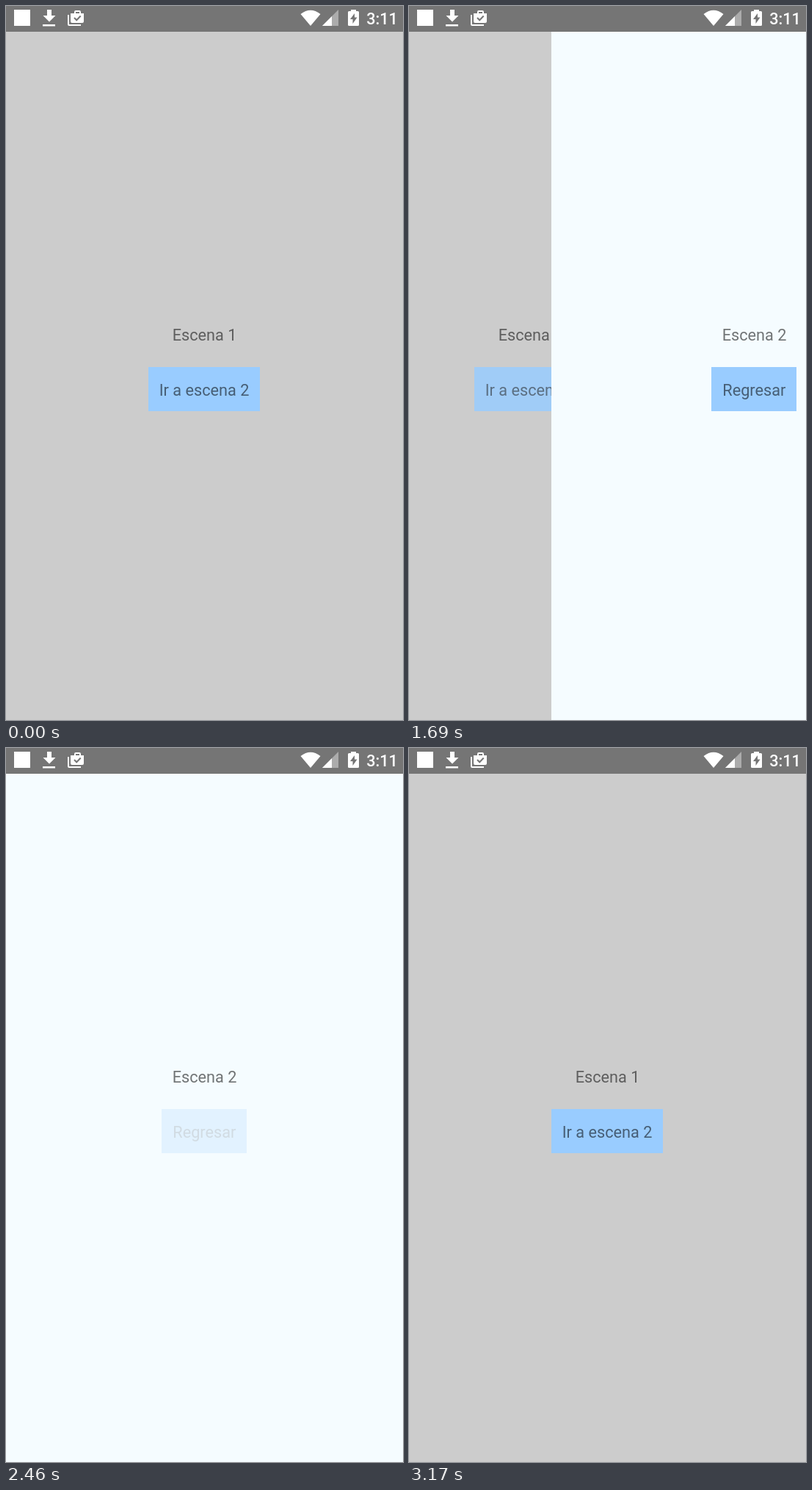
Recreate the animation shown at these times as an HTML page. Size 541 by 971 pixels, loop 3.94 s.

```html
<!DOCTYPE html>
<html lang="es">
<head>
<meta charset="utf-8">
<title>Escenas</title>
<style>
  html, body { margin: 0; width: 100%; height: 100%; overflow: hidden; background: #ccc; }
  svg { display: block; width: 541px; height: 971px; }
  text { font: 400 21.7px Roboto, sans-serif; fill: #000; fill-opacity: .54; text-anchor: middle; }
  .clock { font-weight: 500; fill: #fff; fill-opacity: 1; }
  .box { fill: #9cf; }
  .icons { fill: #fff; }
</style>
</head>
<body>
<svg viewBox="0 0 541 971">
  <rect width="541" height="971" fill="#ccc"/>
  <g id="first">
    <text x="270.5" y="455">Escena 1</text>
    <g id="go">
      <rect class="box" x="194" y="491" width="152" height="60"/>
      <text x="270" y="530">Ir a escena 2</text>
    </g>
  </g>
  <g id="second">
    <rect x="-6" y="35" width="560" height="936" fill="#f5fcff"/>
    <text x="270.5" y="455">Escena 2</text>
    <g id="back">
      <rect class="box" x="212" y="491" width="116" height="60"/>
      <text x="270.3" y="530">Regresar</text>
    </g>
  </g>
  <rect width="541" height="35" fill="#757575"/>
  <g class="icons">
    <rect x="11" y="5" width="22" height="22"/>
    <path d="M56 5h6v8h5.5L59 21.5 50.500 13H56zM50 25h17v2.500H50z"/>
    <path d="M84 12h2v13h16v2H86q-2 0-2-2z"/>
    <path d="M88 10h5V8q0-2 2-2h5q2 0 2 2v2h4v11q0 2-2 2H90q-2 0-2-2zM95 8v2h5V8z" fill-rule="evenodd"/>
    <path d="M93 16l3.200 3.200 5.500-5.700" fill="none" stroke="#757575" stroke-width="2"/>
    <path d="M401.500 11Q415 .500 428.500 11L415 27z"/>
    <path d="M431 27L453 5V27z" fill-opacity=".4"/>
    <path d="M431 27L444 14V27z"/>
    <path d="M466 8.500q0-1.500 1.500-1.500H470V5h7v2h2.500q1.500 0 1.500 1.500v17q0 1.500-1.500 1.500h-12q-1.500 0-1.500-1.500z"/>
    <path d="M475 10v5.500h3.500L472.500 24v-6H469z" fill="#757575"/>
  </g>
  <text class="clock" x="512.500" y="24.500">3:11</text>
</svg>
<script>
  const LOOP = 3940, WIDTH = 541;
  const PUSH = { press: 1300, start: 1594, end: 2000 };
  const POP = { press: 2460, start: 2749, end: 3170 };
  const STEPS = [0, 1300, 1530, 1610, 1690, 1780, 1860, 1930, 2000,
                 2460, 2710, 2780, 2870, 2940, 3020, 3100, 3170];
  const [first, second, go, back] =
    ['first', 'second', 'go', 'back'].map(id => document.getElementById(id));

  // Overdamped spring: distance left, from 1 to 0.
  function remaining(t, { start, end }) {
    if (t <= start) return 1;
    if (t >= end) return 0;
    const s = (t - start) / 1000;
    return 1.193 * Math.exp(-12.5 * s) - 0.193 * Math.exp(-66.9 * s);
  }

  // Pressed buttons drop to 20% and ease back after release.
  function opacity(t, { press, start }) {
    if (t < press) return 1;
    const p = Math.min(1, Math.max(0, (t - start) / 140));
    const eased = p < 0.5 ? 2 * p * p : 1 - 2 * (1 - p) ** 2;
    return 0.2 + 0.8 * eased;
  }

  function move(node, x) {
    node.setAttribute('transform', `translate(${x} 0)`);
  }

  function draw(t) {
    const x = t < POP.press ? remaining(t, PUSH) : 1 - remaining(t, POP);
    const gap = x > 0 ? 6 : 0;
    move(first, Math.round(-164 * (1 - x)));
    move(second, Math.round(WIDTH * x) + gap);
    second.style.display = x < 1 ? '' : 'none';
    go.setAttribute('opacity', opacity(t, PUSH));
    back.setAttribute('opacity', opacity(t, POP));
  }

  function tick() {
    const t = performance.now() % LOOP;
    draw(STEPS.findLast(step => step <= t));
    requestAnimationFrame(tick);
  }
  tick();
</script>
</body>
</html>
```
